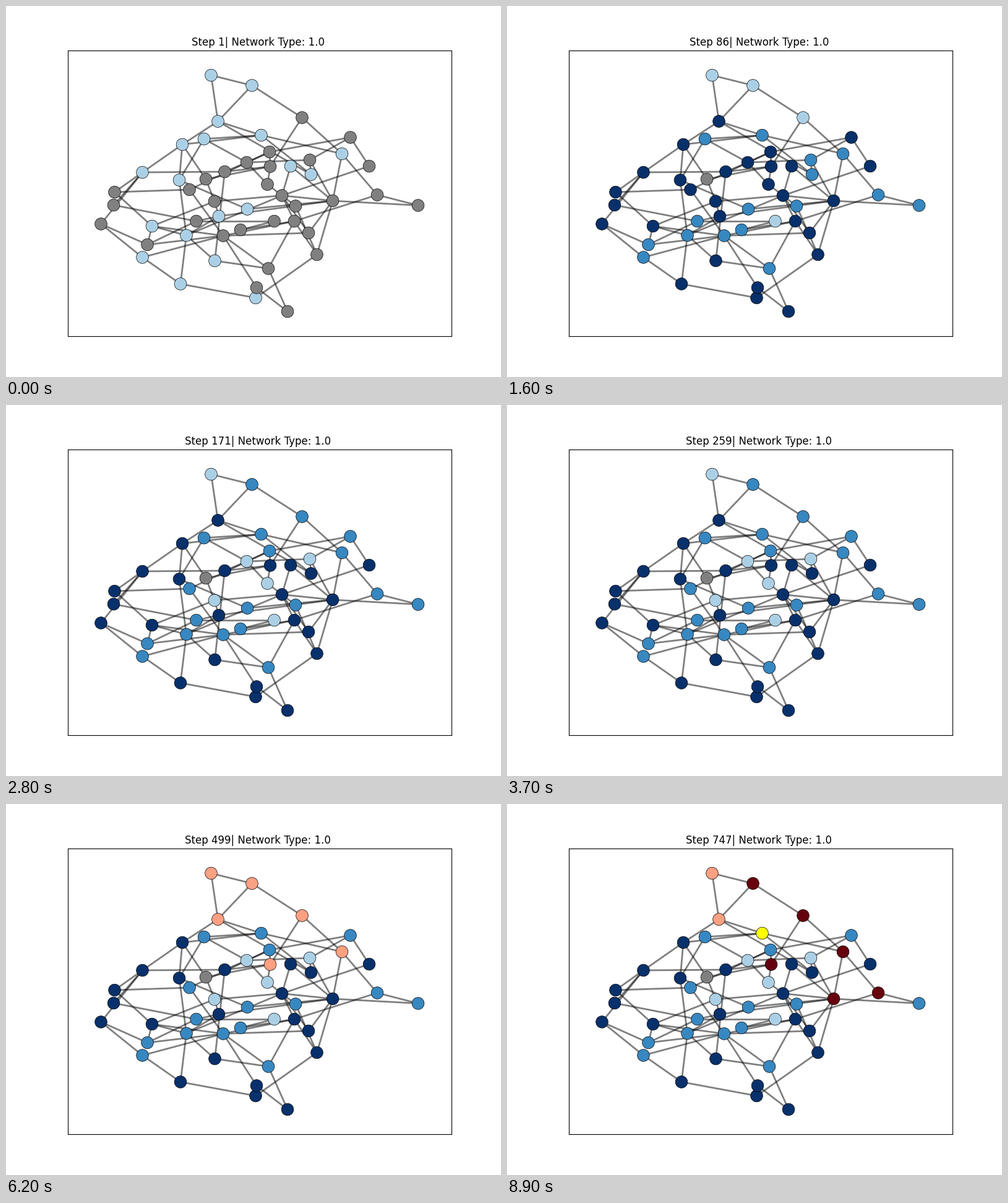
These frames come from a looping animation (800 by 600 pixels, 9000 ms). A matplotlib script:

```python
import numpy as np
import matplotlib.pyplot as plt
from matplotlib.animation import FuncAnimation
from matplotlib.collections import LineCollection

# Stage pixels, in the order of a walk along the network.
NODES = np.array([
    (390, 328.5), (528, 315), (666, 322.5), (600, 305.5), (543, 239),
    (478.5, 180.5), (397.5, 128.5), (331.5, 112), (342.5, 186.5), (493, 272.5),
    (491, 249), (556.5, 212.5), (587, 259), (446, 306.5), (468, 323.5),
    (502.5, 402), (403.5, 472), (282, 449.5), (220.5, 406.5), (153.5, 352.5),
    (228.5, 386), (236, 356), (175.5, 301), (296.5, 297), (426, 236),
    (427, 259.5), (422.5, 288.5), (389, 253), (353.5, 268), (337.5, 412),
    (424, 424.5), (455, 494), (405, 455.5), (351, 371.5), (466, 348),
    (379, 362), (433.5, 348), (307.5, 348), (174, 322), (220.5, 269),
    (285, 224), (412.5, 209), (320, 215), (280, 281.5), (291.5, 371),
    (344, 340), (337, 316), (323, 280), (460, 259), (489, 367),
])
WALK = range(48)
SHORTCUTS = [
    [6, 8, 41, 4, 1, 48, 13, 49, 1, 15, 34, 13, 26],
    [33, 20, 37, 45, 1, 10, 27, 42],
    [17, 44, 21, 46, 13, 44, 29],
    [5, 25, 47, 40, 43, 0],
    [3, 34, 30, 33, 49],
    [25, 28, 39, 19],
    [23, 33, 18], [27, 24, 11],
    [8, 40], [41, 9], [39, 22], [21, 33], [13, 1],
]

GREY, LIGHT, MID, NAVY, SALMON, MAROON, YELLOW = range(7)
blues, reds = plt.get_cmap("Blues"), plt.get_cmap("Reds")
COLORS = np.array([
    (0.5, 0.5, 0.5, 1), blues(1 / 3), blues(2 / 3), blues(1.0),
    reds(1 / 3), reds(1.0), (1, 1, 0, 1),
])

# Levels before and after the first spread.
START = np.full(len(NODES), GREY)
START[np.r_[0, 4, 6:10, 16:19, 21, 29, 39:46, 48]] = LIGHT
RISEN = np.full(len(NODES), NAVY)
RISEN[np.r_[0, 2:5, 9:11, 14, 18, 20, 30, 33, 35, 37, 41:43, 44]] = MID
RISEN[np.r_[5:8, 36]] = LIGHT
RISEN[47] = GREY

# Step after which each node climbs one level per step.
ONSET = 1 + np.arange(len(NODES)) % 3 + (START == GREY)
ONSET[[31, 43]] = 83

# Later changes: step, new level, nodes.
CHANGES = [
    (87, NAVY, np.r_[9]),
    (170, MID, np.r_[5:7, 11, 23:25]),
    (171, LIGHT, np.r_[10, 26:28, 46]),
    (440, SALMON, np.r_[4:9, 25]),
    (745, MAROON, np.r_[5:7]),
    (746, MAROON, np.r_[4, 25]),
    (747, MAROON, np.r_[1, 3]),
    (747, YELLOW, np.r_[41]),
]

# Every tenth step is shown, and each step in which something spreads.
STEPS = sorted({*range(1, 8), 85, 86, *range(9, 748, 10),
                *(step for step, _, _ in CHANGES)})


def state_at(step):
    state = np.minimum(RISEN, np.maximum(START, step - ONSET))
    for when, level, nodes in CHANGES:
        if step >= when:
            state[nodes] = level
    return state


fig, ax = plt.subplots(figsize=(8, 6), dpi=100)
ax.set(xlim=(100, 720), ylim=(534, 72), xticks=[], yticks=[])

links = [NODES[[a, b]] for trail in [WALK, *SHORTCUTS]
         for a, b in zip(trail, trail[1:])]
ax.add_collection(LineCollection(links, colors="black", linewidths=2,
                                 alpha=0.5, zorder=1))
dots = ax.scatter(*NODES.T, s=200, c=COLORS[START], edgecolors="black",
                  linewidths=0.5, zorder=2)
title = ax.set_title("")


def draw(frame):
    step = STEPS[frame]
    dots.set_facecolor(COLORS[state_at(step)])
    title.set_text(f"Step {step}| Network Type: 1.0 ")
    return dots, title


anim = FuncAnimation(fig, draw, frames=len(STEPS), interval=100, repeat=True,
                     repeat_delay=0, blit=False)
plt.show()
```
